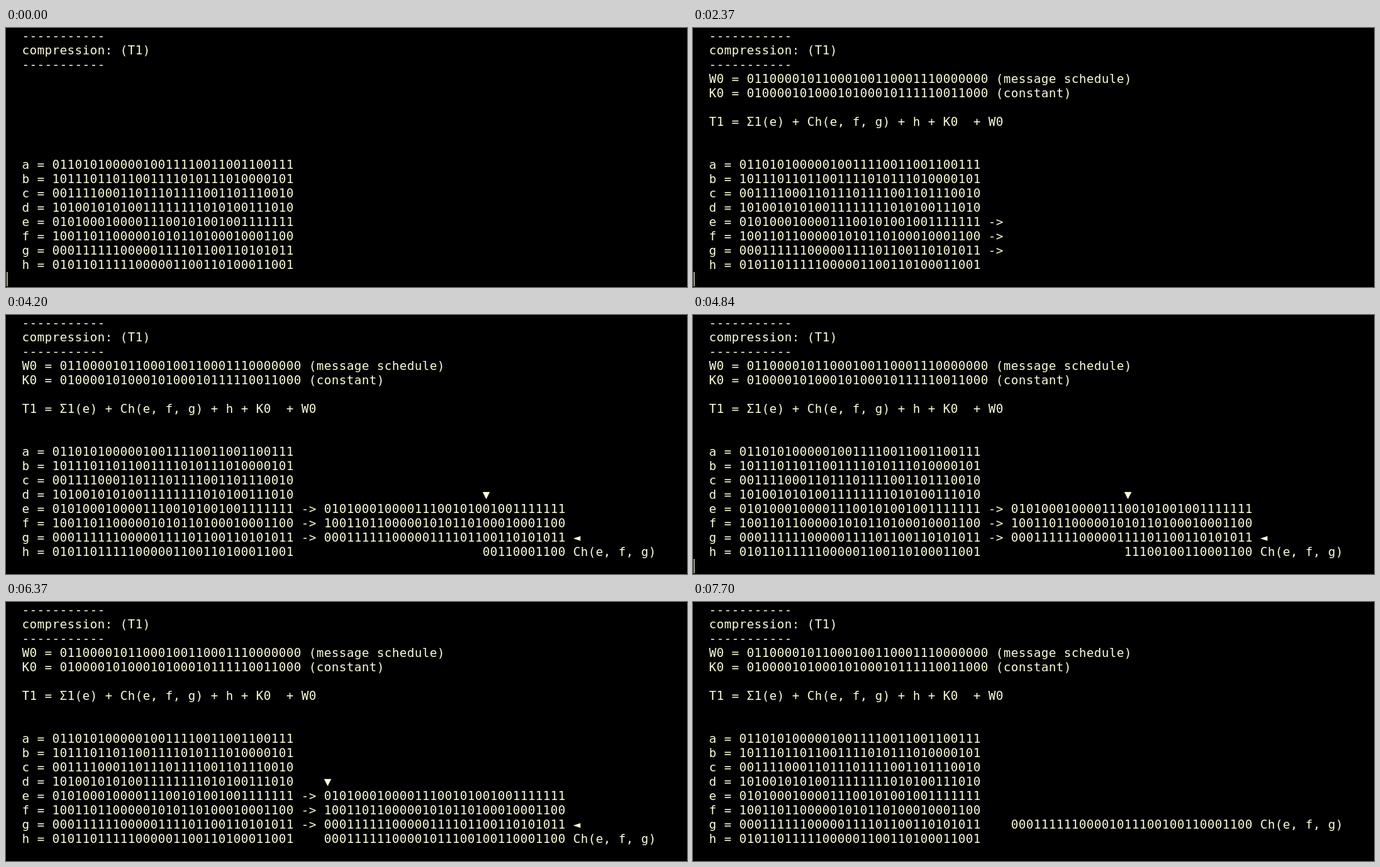
Animation, 902 px wide and 344 px high, one loop 8 s. Source, as an HTML page with a canvas:

```html
<!DOCTYPE html>
<html lang="en">
<head>
<meta charset="utf-8">
<title>Compression T1</title>
<style>
  html, body { margin: 0; width: 100%; height: 100%; overflow: hidden; background: #000; }
  canvas { display: block; }
</style>
</head>
<body>
<canvas id="term" width="902" height="344"></canvas>
<script>
const ctx = document.getElementById('term').getContext('2d');
const LOOP = 8000, CELL = 10, LINE = 19, LEFT = 1, BASE = 16;
const INK = '#ffffdd';

// SHA-256 working registers, first message word and first constant
const regs = {
  a: 0x6a09e667, b: 0xbb67ae85, c: 0x3c6ef372, d: 0xa54ff53a,
  e: 0x510e527f, f: 0x9b05688c, g: 0x1f83d9ab, h: 0x5be0cd19
};
const W0 = 0x61626380, K0 = 0x428a2f98;
const choice = (regs.e & regs.f) ^ (~regs.e & regs.g);
const bits = n => (n >>> 0).toString(2).padStart(32, '0');

const COPY = 42, NOTE = 75, ROW_D = 12, ROW_E = 13, ROW_F = 14, ROW_G = 15, ROW_H = 16;

// Runs of steps 100 ms apart: [first time, steps]
const runs = [[3170, 3], [3500, 5], [4000, 4], [4440, 9], [5340, 5], [5870, 6]];
const bitTimes = runs.flatMap(([from, n]) => Array.from({ length: n }, (_, i) => from + i * 100));

// Each character sits in the middle of its terminal cell
function put(col, row, text) {
  [...text].forEach((ch, i) => {
    if (ch !== ' ') ctx.fillText(ch, LEFT + (col + i + 0.5) * CELL, BASE + row * LINE);
  });
}

function cursorOn(t) {
  if (t < 970) return t < 400;
  return Math.floor((t - 970) / 600) % 2 === 0;
}

function drawChoice(t) {
  const count = bitTimes.filter(at => at <= t).length;
  if (!count) return;
  const pos = 32 - count;
  const row = t < 7700 ? ROW_H : ROW_G;
  put(COPY + pos, row, bits(choice).slice(pos));
  put(NOTE, row, 'Ch(e, f, g)');
  if (t < 6870) {
    put(COPY + pos, ROW_D, '▼');
    put(NOTE, bits(regs.e)[pos] === '1' ? ROW_F : ROW_G, '◄');
  }
}

function draw(t) {
  ctx.fillStyle = '#000';
  ctx.fillRect(0, 0, 902, 344);
  ctx.font = '16px "DejaVu Sans Mono", monospace';
  ctx.textAlign = 'center';
  ctx.fillStyle = INK;

  put(2, 0, '-'.repeat(11));
  put(2, 1, 'compression: (T1)');
  put(2, 2, '-'.repeat(11));
  if (t >= 370) put(2, 3, `W0 = ${bits(W0)} (message schedule)`);
  if (t >= 770) put(2, 4, `K0 = ${bits(K0)} (constant)`);
  if (t >= 1170) put(2, 6, 'T1 =');
  if (t >= 1770) put(7, 6, 'Σ1(e) + Ch(e, f, g) + h + K0  + W0');

  Object.entries(regs).forEach(([name, n], i) => put(2, 9 + i, `${name} = ${bits(n)}`));

  [regs.e, regs.f, regs.g].forEach((n, i) => {
    if (t >= 2370 && t < 7300) put(39, ROW_E + i, '->');
    if (t >= 2770 && t < 7300) put(COPY, ROW_E + i, bits(n));
  });
  drawChoice(t);

  if (cursorOn(t)) ctx.fillRect(LEFT, 324, 1, LINE);
}

const start = performance.now();
function tick() {
  draw((performance.now() - start) % LOOP);
  requestAnimationFrame(tick);
}
draw(0);
tick();
</script>
</body>
</html>
```
